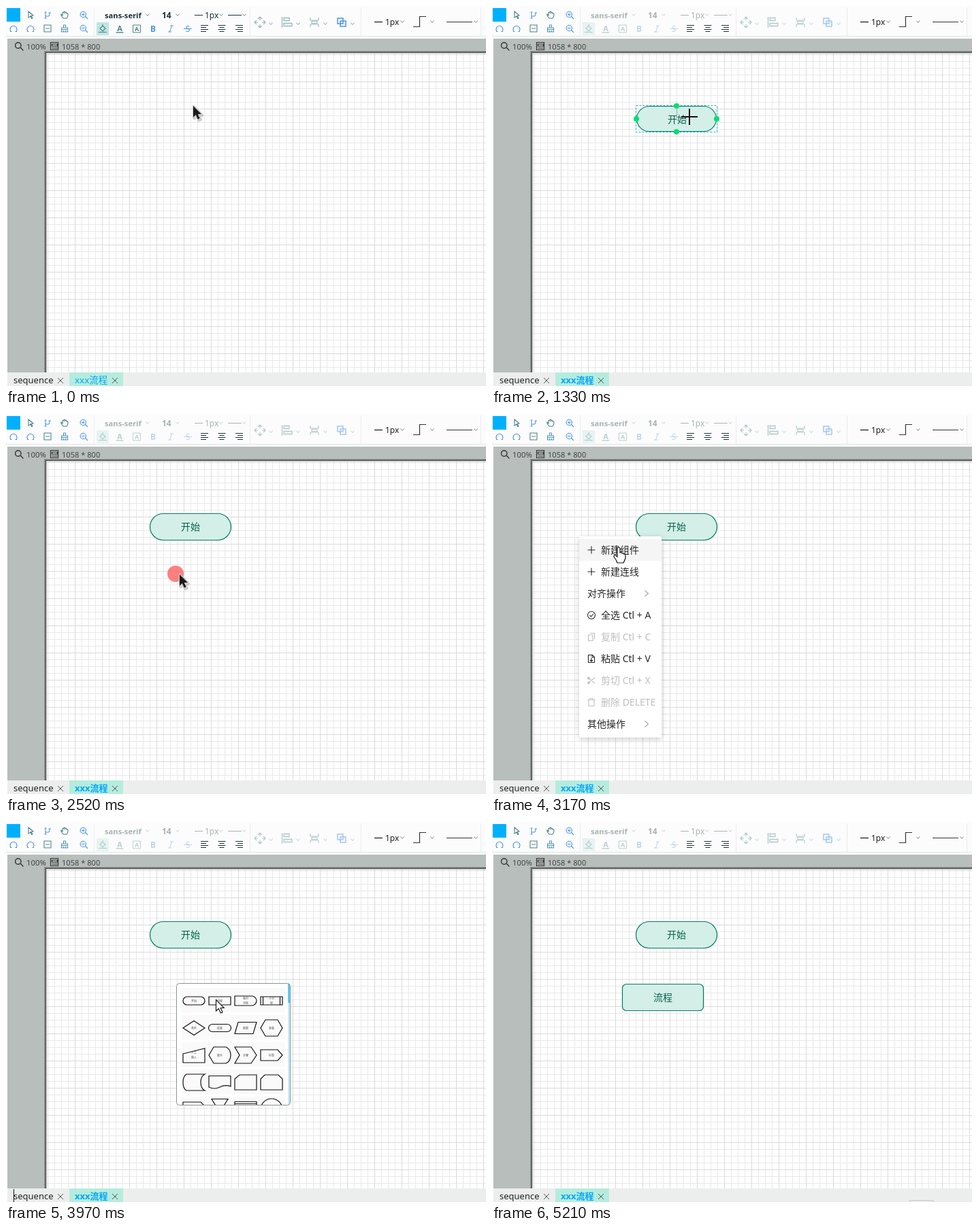
An HTML page with a canvas for the animation above (5.29 s loop, 705 by 559 pixels).

```html
<!DOCTYPE html>
<html lang="zh">
<head>
<meta charset="utf-8">
<style>
html, body { margin: 0; width: 100%; height: 100%; overflow: hidden; background: #fff; }
canvas { display: block; }
</style>
</head>
<body>
<canvas id="stage" width="705" height="559"></canvas>
<script>
const c = document.getElementById('stage').getContext('2d');
const LOOP = 5290;
const TEAL = '#4a8288', BLUE = '#4b92e6', INK = '#1c3238', GREEN = '#067c60';

// ---------- helpers ----------
function box(x, y, w, h, fill) {
  c.fillStyle = fill;
  c.fillRect(x, y, w, h);
}
function path(d, x, y, stroke, width = 1, fill) {
  const p = new Path2D(d);
  c.save();
  c.translate(x, y);
  if (fill) { c.fillStyle = fill; c.fill(p); }
  if (stroke) { c.strokeStyle = stroke; c.lineWidth = width; c.stroke(p); }
  c.restore();
}
function round(x, y, w, h, r, stroke, fill, width = 1) {
  c.beginPath();
  c.roundRect(x, y, w, h, r);
  if (fill) { c.fillStyle = fill; c.fill(); }
  if (stroke) { c.strokeStyle = stroke; c.lineWidth = width; c.stroke(); }
}
function disc(x, y, r, fill) {
  c.beginPath();
  c.arc(x, y, r, 0, 7);
  c.fillStyle = fill;
  c.fill();
}
function text(s, x, y, size, color, weight = 400, align = 'left') {
  c.font = `${weight} ${size}px "Noto Sans", "Noto Sans CJK SC", "Noto Sans CJK", sans-serif`;
  c.textAlign = align;
  c.fillStyle = color;
  c.fillText(s, x, y);
}
function faded(alpha, draw) {
  c.save();
  c.globalAlpha *= alpha;
  draw();
  c.restore();
}
const within = (t, from, to) => t >= from && t < to;
const chevron = (x, y, color = '#7d8a8c') => path('M-2.5-1.5L0 1.5 2.5-1.5', x, y, color);

// ---------- toolbar ----------
const arc = 'M-2.5 4.5H-4.5V3.5A5 5 0 1 1 4.5 3.5V4.5H2.5';
const lens = 'M3.5-.5A4.2 4.2 0 1 1-4.9-.5A4.2 4.2 0 1 1 3.5-.5M2.5 2.5L6 6M-3-.5H1.6';
const icons = [
  ['M-3-5L4 1 1 1.5 3 5 1.5 5.5 0 2-3 4Z', 36, 13, TEAL],
  ['M-3 5V-4M-3 2H1Q3 2 3-3M-4.5-4H-1.5M1.5-3H5M-4.5 5H-1.5', 61, 13, BLUE],
  ['M-2 5Q-6 1-5-1L-3 1V-3Q-2-5-1-3V-4Q0-6 1-4V-3Q3-5 3-2Q5-3 5 0Q5 3 3 5Z', 86, 13, TEAL],
  [lens + 'M-.7-2.8V1.8', 114, 13, BLUE],
  [arc, 11, 33, BLUE], [arc, 36, 33, BLUE],
  ['M-5-5H5V5H-5ZM-3 0H3', 61, 33, TEAL],
  ['M-4.5 5V-1H4.5V5ZM-4.5 1.5H4.5M-1.5-1V-5H1.5V-1M-1.5 5V3M1.5 5V3', 86, 33, BLUE],
  [lens, 114, 33, BLUE]
];
const lines = {
  left: 'M-6-4.5H5M-6-1.5H2M-6 1.5H5M-6 4.5H2',
  mid: 'M-5.5-4.5H5.5M-3.5-1.5H3.5M-5.5 1.5H5.5M-3.5 4.5H3.5',
  right: 'M-5-4.5H6M-2-1.5H6M-5 1.5H6M-2 4.5H6'
};

function toolbar(t) {
  const dim = t < 140 ? 1 : t < 400 ? .65 : .36;
  box(0, 0, 705, 44, '#fcfcfc');
  box(0, 44, 705, 1, '#e4e4e4');
  box(1, 3, 20, 20, '#00b0ff');
  for (const [d, x, y, color] of icons) path(d, x, y, color, 1.1);
  for (const x of [129, 358, 521, 697]) box(x, 2, 1, 42, '#ececec');

  faded(dim, () => {
    text('sans-serif', 145, 18, 11.2, INK, 700);
    text('14', 229, 18, 12, INK, 700);
    text('1px', 292, 18, 12, INK);
    path('M277 13.5H289M326 13.5H346', 0, 0, INK);
    for (const x of [208, 252, 316, 350]) chevron(x, 13);

    box(133, 24, 18, 19, '#bfe6e1');
    path('M-4 0L0-4 4 0 0 4ZM0-4V-6M-6 5.5H6', 142, 33, TEAL, 1.2);
    text('A', 167, 37, 11, TEAL, 600, 'center');
    path('M-5.5 6H5.5', 167, 33, TEAL, 1.4);
    path('M-5.5-5.5H5.5V5.5H-5.5Z', 192, 33.5, TEAL);
    text('A', 192, 37, 9, TEAL, 600, 'center');
    text('B', 216, 38, 12, BLUE, 600, 'center');
    path('M-1-4.5H4M-4 4.5H1M1.5-4.5L-1.5 4.5', 242, 33.5, BLUE);
    text('S', 267, 38, 12, BLUE, 400, 'center');
    path('M-6 0H6', 267, 33.5, BLUE);
  });
  path(lines.left, 292, 33, INK, 1.2);
  path(lines.mid, 317, 33, INK, 1.2);
  path(lines.right, 342, 33, INK, 1.2);

  faded(t < 400 ? .55 : .42, () => {
    path('M-3-5L0-8 3-5M-3 5L0 8 3 5M-5-3L-8 0-5 3M5-3L8 0 5 3M0-8V-3M0 8V3M-8 0H-3M8 0H3', 373, 24, TEAL, 1.2);
    path('M-7.5-8V8M-5-6.5H3V-2.5H-5ZM-5 1.5H7V5.5H-5Z', 413, 24, TEAL, 1.3);
    path('M-6-7V-3H6V-7M-6 7V3H6V7M-4-1.5H4V1.5H-4Z', 453, 24, TEAL, 1.1);
  });
  faded(t < 400 ? 1 : .5, () => {
    path('M-6-6H2V2H-6ZM-2-2H6V6H-2Z', 493, 24, BLUE, 1.5);
    for (const x of [389, 429, 469, 509]) chevron(x, 26, '#7aa5b5');
  });
  path('M541 23.5H553', 0, 0, '#222', 1.3);
  text('1px', 557, 28, 12, '#222');
  path('M598 30.5H607.5V15.5H617M647 23.5H685', 0, 0, '#333', 1.2);
  for (const x of [582, 626, 690]) chevron(x, 23);
}

// ---------- workspace ----------
function workspace(t) {
  box(2, 48, 703, 491, '#b7bebc');
  path('M3-1A4.2 4.2 0 1 1-5.4-1A4.2 4.2 0 1 1 3-1M2 2L6.5 6.5', 19, 59, '#333', 1.4);
  text('100%', 30, 64, 11.4, '#444');
  path('M-5.5-5.5H5.5M-5.5 5.5H5.5M-3.5-3H4.5V0H-3.5ZM-3.5 3H4.5M-5.5-6V6M5.5-6V6', 71, 59, '#333', 1.2);
  text('1058 * 800', 82, 64, 11.1, '#444');

  box(56, 66, 649, 473, '#979d9b');
  box(57, 67, 648, 472, '#626665');
  box(59, 69, 646, 470, '#c4c6c5');
  box(60, 70, 645, 469, '#fff');
  for (const [gap, color] of [[10, '#e9e9e9'], [40, '#dadada']]) {
    for (let x = 61; x < 705; x += gap) box(x, 70, 1, 469, color);
    for (let y = 71; y < 539; y += gap) box(60, y, 645, 1, color);
  }
}

function tabs(t) {
  box(2, 539, 703, 20, '#eceeed');
  box(93, 539, 79, 20, '#b5ecdd');
  text('sequence', 11, 555, 13, '#222');
  text('xxx流程', 101, 555, t < 1070 ? 13.4 : 13, '#00a6ff', t < 1070 ? 400 : 700);
  for (const x of [80, 160]) path('M-4-4L4 4M4-4L-4 4', x, 551, '#555');
}

function node(label, x, y, radius, selected) {
  const inset = selected ? 1 : 0;
  round(x + .5 + inset, y + .5 + inset, 119 - 2 * inset, 39 - 2 * inset, radius, GREEN, '#d3efe7', 1.2);
  text(label, x + 60 + inset, y + 25 + inset, 14, '#08604c', 400, 'center');
  if (!selected) return;
  c.setLineDash([3, 2]);
  round(x + .5, y + .5, 119, 39, 0, '#1fb4ee');
  c.setLineDash([]);
  for (const [dx, dy] of [[60, 1], [1, 20], [119, 20], [60, 39]]) disc(x + dx, y + dy, 4, '#00df73');
}

// ---------- shape picker ----------
const shapes = [
  ['M-10-6H10A6 6 0 0 1 10 6H-10A6 6 0 0 1-10-6Z', '开始'],
  ['M-16-6H16V6H-16Z', '流程'],
  ['M-16-7H9A7 7 0 0 1 9 7H-16Z', '临时 流程'],
  ['M-16-6H16V6H-16ZM-12.5-6V6M12.5-6V6', '子流 程'],
  ['M0-10.5L16 0 0 10.5-16 0Z', '条件'],
  ['M-11-5.5H11A5.5 5.5 0 0 1 11 5.5H-11A5.5 5.5 0 0 1-11-5.5Z', '结束'],
  ['M-11-8.5H16L11 8.5H-16Z', '数据'],
  ['M-9-12H9L16 0 9 12H-9L-16 0Z', '准备'],
  ['M-16-2L16-10V11H-16Z', '人工 输入'],
  ['M-9-12H9Q16-9 16 0Q16 9 9 12H-9L-16 0Z', '展示'],
  ['M-16-12H8L16 0 8 12H-16L-9 0Z', '步骤'],
  ['M-16-8H9L16 0 9 8H-16Z', '标签'],
  ['M-11-12H16Q10-9 10 0Q10 9 16 12H-11Q-16 9-16 0Q-16-9-11-12Z'],
  ['M-16-9.5H16V6Q8 3 0 7Q-8 11-16 7Z'],
  ['M-9-11H16V11H-16V-5Z'],
  ['M-10-11H10L16-5V11H-16V-5Z'],
  ['M-16-11H10L16-5V12H-16Z'],
  ['M-12-15.5H12L0 4Z'],
  ['M-16-11.5H16V12H-16ZM-16-8.5H16'],
  ['M-16 0A16 16 0 0 1 16 0Z']
];

function picker(x, y, thumb) {
  c.save();
  round(x + .5, y + .5, 167, 179, 4, null, '#fff');
  c.clip();
  for (let row = 0; row < 5; row++) box(x + 8, y + 7 + 40 * row, 152, 36, '#fafafa');
  box(x + 164, y, 4, 180, '#c3ecf9');
  box(x + 164, y, 4, 29, thumb);
  shapes.forEach(([d, label], i) => {
    const sx = x + 26 + i % 4 * 38, sy = y + 26 + (i >> 2) * 40;
    path(d, sx, sy, '#111', 1.2);
    const words = label ? label.split(' ') : [];
    words.forEach((w, k) => text(w, sx, sy + 1.6 + (k - (words.length - 1) / 2) * 7, 4, '#5d4750', 400, 'center'));
  });
  c.restore();
  round(x + .5, y + .5, 167, 179, 4, '#8d9499');
}

// ---------- context menu ----------
const plus = 'M-5.5 0H5.5M0-5.5V5.5';
const items = [
  ['新建组件', plus], ['新建连线', plus], ['对齐操作'],
  ['全选 Ctl + A', 'M5.5 0A5.5 5.5 0 1 1-5.5 0A5.5 5.5 0 1 1 5.5 0M-2.5 0L-.5 2 3-2'],
  ['复制 Ctl + C', 'M-4.5-3H2V5.5H-4.5ZM-2-5.5H4.5V3.5', true],
  ['粘贴 Ctl + V', 'M-4.5-5.5H1.5L4.5-2.5V5.5H-4.5ZM1-5V-2H4M0-1V4M-2 2L0 4 2 2'],
  ['剪切 Ctl + X', 'M-5-4L5 4M-5 4L5-4M-2.5-3.5A1.5 1.5 0 1 1-5.5-3.5A1.5 1.5 0 1 1-2.5-3.5M-2.5 3.5A1.5 1.5 0 1 1-5.5 3.5A1.5 1.5 0 1 1-2.5 3.5', true],
  ['删除 DELETE', 'M-5.5-3.5H5.5M-4-3.5V5.5H4V-3.5M-2-3.5V-5.5H2V-3.5', true],
  ['其他操作']
];

function menu(t) {
  c.save();
  if (t < 2780) {
    c.globalAlpha = .75;
    c.translate(0, 180);
    c.scale(1, .96);
    c.translate(0, -180);
  }
  c.save();
  c.shadowColor = 'rgba(0,0,0,.2)';
  c.shadowBlur = 8;
  c.shadowOffsetY = 2;
  round(128, 180, 121, 296, 2, null, '#fff');
  c.restore();
  if (t >= 3040) box(128, 184, 121, 32, '#f5f5f5');
  items.forEach(([label, icon, off], i) => {
    const y = 200 + 32 * i, color = off ? '#bfbfbf' : '#262626';
    if (icon) path(icon, 146, y, color, 1.1);
    else path('M-2.5-4.5L2.5 0-2.5 4.5', 227, y, '#777');
    text(label, icon ? 160 : 140, y + 5, 14, color);
  });
  c.restore();
}

// ---------- pointer ----------
const arrow = 'M0 0V16.5L3.8 13 6.8 19.5 9.6 18.2 6.6 12H11.8Z';
const pointers = {
  black(x, y) {
    c.lineJoin = 'round';
    path(arrow, x + 1.5, y + 2, 'rgba(120,120,120,.35)', 4);
    path(arrow, x, y, '#c9c9c9', 2.5, '#111');
    path(arrow, x, y, null, 1, '#1a1a1a');
    c.lineJoin = 'miter';
  },
  white: (x, y) => path(arrow, x + .5, y + .5, '#111', 1.1, '#fff'),
  hand: (x, y) => path('M-2 1.5Q0-1.5 2 1.5V8Q4 7 5 9Q7 8 7.500 10Q10 9.500 10 12V16Q9 19 7 23H-2Q-3 19-7 14Q-7 11-4.500 12L-2 14Z', x, y, '#111', 1.2, '#fff'),
  cross: (x, y) => path('M-12 0H12M0-12V12', x, y, '#1d0a0e', 2)
};
const moves = [
  [0, 'black', 275, 147], [660, 'white', 275, 147], [940, 'white', 282, 152],
  [1070, 'white', 290, 163], [1200, 'cross', 290, 163], [1610, 'cross', 290, 163],
  [1740, 'black', 285, 166], [2000, 'black', 252, 177], [2390, 'black', 255, 236],
  [2780, 'black', 255, 236], [2910, 'hand', 228, 222], [3170, 'hand', 186, 196],
  [3450, 'hand', 186, 196], [3580, 'black', 200, 206], [3840, 'white', 285, 250],
  [3970, 'white', 308, 261], [4230, 'cross', 310, 263], [4360, 'cross', 310, 263],
  [4490, 'black', 365, 300], [4620, 'black', 465, 369], [5140, 'black', 635, 552],
  [5210, '', 635, 559]
];

function pointer(t) {
  const i = moves.findLastIndex(m => m[0] <= t);
  const [t0, kind, x0, y0] = moves[i];
  if (!kind) return;
  const [t1, , x1, y1] = moves[i + 1];
  const k = (t - t0) / (t1 - t0);
  const x = x0 + (x1 - x0) * k, y = y0 + (y1 - y0) * k;
  const clicked = [400, 1070, 2520, 3300, 4100].some(s => within(t, s, s + 130));
  if (clicked) disc(x - 6, y - 1, 12, 'rgba(255,92,92,.78)');
  pointers[kind](x, y);
}

function hold(t) {
  const start = [5210, 3450, 1480, 810, 140, 0].find(s => s <= t);
  return start + Math.floor((t - start) / 130) * 130;
}

function frame(now) {
  const t = hold(now % LOOP);
  box(0, 0, 705, 559, '#fff');
  toolbar(t);
  workspace(t);
  if (t >= 1200) node('开始', 211, 146, 20, t < 1740);
  if (t >= 4230) node('流程', 191, 238, 6, t < 4490);
  if (within(t, 530, 1200)) picker(270, 145, '#82b5ee');
  if (within(t, 2650, 3580)) menu(t);
  if (within(t, 3710, 4230)) picker(250, 237, '#5ccaf7');
  tabs(t);
  if (within(t, 140, 1070)) box(143, 3, 1, 20, '#888');
  if (within(t, 1200, 1480)) box(271, 148, 1, 17, '#8fa8a2');
  if (within(t, 3840, 4360) || within(t, 4620, 4880)) box(11, 540, 1, 19, '#111');
  if (t >= 5210) round(613.5, 557, 35, 8, 1, '#b9b9b9', '#f6f6f6');
  pointer(t);
  requestAnimationFrame(frame);
}
requestAnimationFrame(frame);
</script>
</body>
</html>
```
